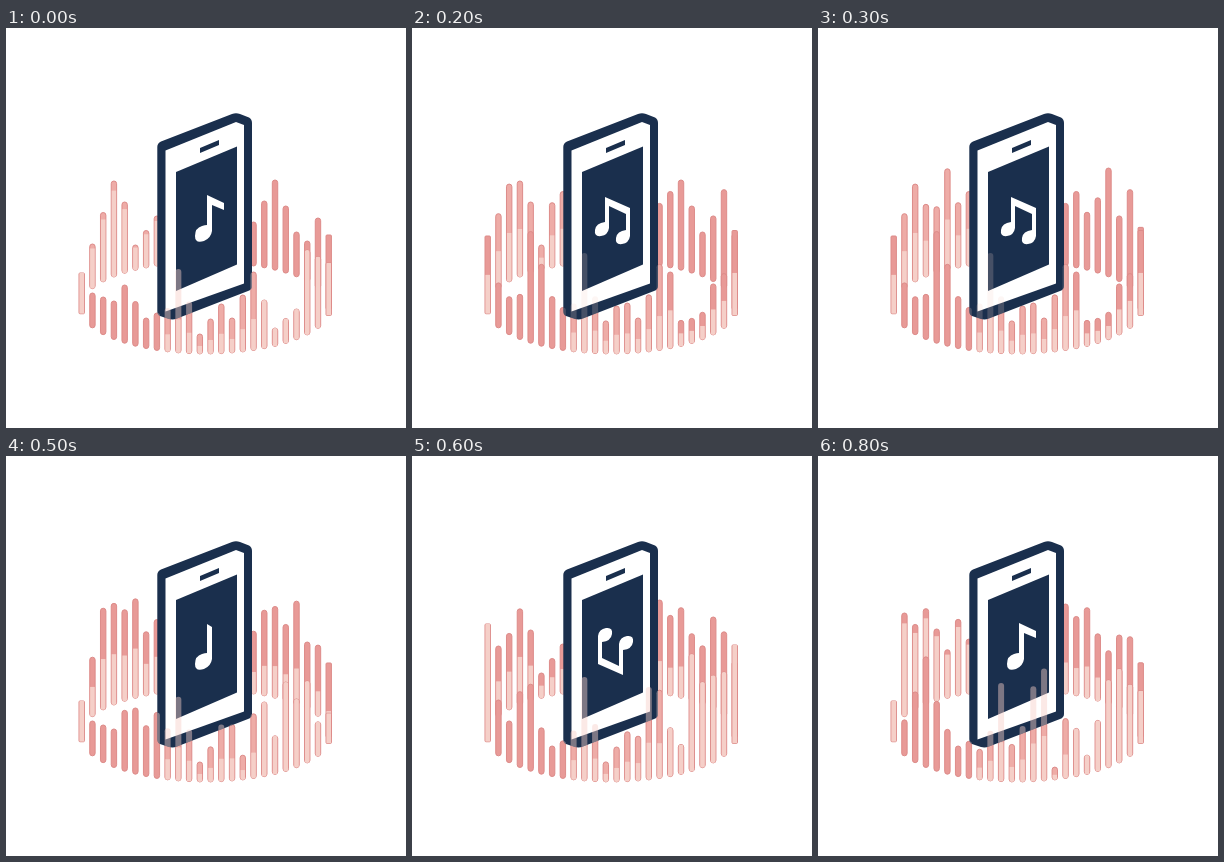
Recreate the animation shown at these times as an HTML page with a canvas. Size 400 by 400 pixels, loop 0.9 s.

```html
<!DOCTYPE html>
<html lang="en">
<head>
<meta charset="utf-8">
<title>Music phone</title>
<style>
  html, body { margin: 0; width: 100%; height: 100%; overflow: hidden; background: #fff; }
  canvas { display: block; width: 100vw; height: 100vh; }
</style>
</head>
<body>
<canvas id="stage"></canvas>
<script>
const STEP = 100, STEPS = 9, BARS = 24;
const NAVY = '#1a2f4d', DARK = '#e89a97', MID = '#eeaca7', LIGHT = '#f5cfc8', EDGE = '#dd8b89';

const canvas = document.getElementById('stage');
const ctx = canvas.getContext('2d');
const ratio = window.devicePixelRatio || 1;
canvas.width = canvas.height = 400 * ratio;
ctx.scale(ratio, ratio);

// Resting skyline of each half of the ring: [bar, top] corners joined by lines.
const backRest = [[1, 216], [3, 153], [4, 174], [5, 217], [7, 188], [16, 194], [18, 152], [20, 204], [21, 213], [22, 190], [23, 207]];
const frontRest = [[0, 245], [1, 265], [3, 273], [4, 257], [6, 290], [8, 280], [9, 241], [11, 306], [13, 276], [14, 290], [16, 244], [18, 300], [20, 281], [21, 222], [23, 235]];

// Swells that lift or lower the skyline: [centre bar, rise].
const phases = {
  rest: { back: [], front: [] },
  beat: {
    back: [[1.5, 42], [3.5, -36], [5, 78], [7, 24], [16.5, 26], [18, -34], [20, 64], [22, 28]],
    front: [[0, 37], [4.3, 60], [6, 20], [9, 16], [11.5, 18], [17, 28], [21.4, -42], [23, 34]]
  },
  ebb: {
    back: [[1.8, 34], [5, 74], [7, 24], [16.5, 26], [20.2, 62]],
    front: [[5.3, 24], [7, 28], [14, 28], [15.2, -42], [17.2, 28], [19.3, 72], [22.3, -42]]
  },
  echo: {
    back: [[1, 26], [16, 50], [21, 52]],
    front: [[0, 77], [3.4, 46], [9, 20], [15, 36], [19.3, 104], [23, 46]]
  },
  close: {
    back: [[1, 59], [5.7, 44], [16, 46], [21, 34]],
    front: [[2.8, 76], [9, -50], [10, 60], [12.5, 28], [14, 95], [15, -70], [19.8, 60]]
  }
};

function phaseAt(step) {
  if (step === 0) return 'rest';
  if (step < 4) return 'beat';
  if (step < 6) return 'ebb';
  return step < 8 ? 'echo' : 'close';
}

function skyline(points, i) {
  const k = Math.max(1, points.findIndex(p => p[0] >= i));
  const [[x0, y0], [x1, y1]] = [points[k - 1], points[k]];
  return y0 + (y1 - y0) * (i - x0) / (x1 - x0);
}

const swell = (list, i) =>
  list.reduce((sum, [centre, rise]) => sum + rise * Math.exp(-1.3 * (i - centre) ** 2), 0);

const barX = i => 75.7 + i * 10.74;
const ringDepth = i => 45 * Math.sqrt(Math.max(0, 1 - ((barX(i) - 199.5) / 124.5) ** 2));

// The strong colour covers the given share from the top, the light one the remainder.
function drawBar(i, top, bottom, share, strong) {
  const x = barX(i) - 2.7, width = 5.4, split = top + (bottom - top) * share;
  ctx.save();
  ctx.beginPath();
  ctx.roundRect(x, top, width, bottom - top, i % (BARS - 1) ? 2.7 : 1);
  ctx.fillStyle = strong;
  ctx.fill();
  ctx.strokeStyle = EDGE;
  ctx.stroke();
  ctx.clip();
  ctx.fillStyle = LIGHT;
  ctx.fillRect(x + .4, split, width - .8, bottom - split);
  ctx.restore();
}

function drawBack(step) {
  const list = phases[phaseAt(step)].back;
  for (let i = 1; i < BARS; i++) {
    if (i > 7 && i < 16) continue;
    const left = i < 8;
    const late = step < 3 && (i + 4) % 5 > 1;
    const top = skyline(backRest, i) - (late ? 0 : swell(list, i));
    const bottom = i === BARS - 1 ? 281 : 279.5 - ringDepth(i);
    const share = left ? (step % 8 ? .5 : .1) : (step < 4 ? 1 : .65);
    drawBar(i, top, bottom, share, left && step < 4 ? MID : DARK);
  }
}

const frontTop = (i, step) => skyline(frontRest, i) - swell(phases[phaseAt(step)].front, i);

function drawFront(step) {
  const beat = phaseAt(step) === 'beat';
  for (let i = 0; i < BARS; i++) {
    const right = i > 16 || i === 0;
    const share = right ? (beat ? .5 : 0) : i < 8 ? 1 : .6;
    drawBar(i, frontTop(i, step), 281 + ringDepth(i), share, i > 7 && i < 17 ? MID : DARK);
  }
}

// The front half of the ring shows through over the phone.
function drawVeil(step) {
  ctx.save();
  ctx.clip(body);
  ctx.globalAlpha = phaseAt(step) === 'beat' ? .2 : .45;
  ctx.fillStyle = LIGHT;
  for (let i = 7; i < 17; i++) {
    const top = frontTop(i, step);
    ctx.beginPath();
    ctx.roundRect(barX(i) - 3, top, 6, 281 + ringDepth(i) - top, 3);
    ctx.fill();
  }
  ctx.restore();
}

const shape = d => new Path2D(d);
const body = shape('M151.3 119Q151.3 115 155 113.500L226 86Q230 84.500 234 86L243 89.500Q246 91 246 95V258Q246 261.500 242 263L171 290.500Q167 292 163 291L154 288Q151.300 287 151.300 283Z');
const face = shape('M159.500 122.500L230 94L238 97V255.500L159.500 283.500Z');
const screen = shape('M170 144L231 118.500V236.500L170 263Z');
const speaker = shape('M194 120L213 112V117L194 125Z');

const head = 'V203Q205 210 198 213Q189 216 189 208Q189 200 196 198Q199 197 201 197Z';
const eighth = shape('M201 167L218 175V182L206 177' + head);
const quarter = shape('M201 168L206 171' + head);
const beamed = shape('M193 169L218 180V208Q217 215 210 216Q203 217 204 210Q205 203 214 202V186L197 178V200Q196 207 189 208Q182 209 183 202Q184 195 193 194Z');

function fill(path, color) {
  ctx.fillStyle = color;
  ctx.fill(path);
}

function drawNote(step) {
  ctx.save();
  if (phaseAt(step) === 'echo') {
    ctx.translate(404, 388);
    ctx.rotate(Math.PI);
  }
  const note = step < 2 || step === 8 ? eighth : phaseAt(step) === 'ebb' ? quarter : beamed;
  fill(note, '#fff');
  ctx.restore();
}

function draw(step) {
  ctx.fillStyle = '#fff';
  ctx.fillRect(0, 0, 400, 400);
  drawBack(step);
  drawFront(step);
  fill(body, NAVY);
  fill(face, '#fff');
  fill(screen, NAVY);
  fill(speaker, NAVY);
  drawNote(step);
  drawVeil(step);
}

const start = performance.now();
function tick() {
  draw(Math.floor((performance.now() - start) / STEP) % STEPS);
  requestAnimationFrame(tick);
}
tick();
</script>
</body>
</html>
```
